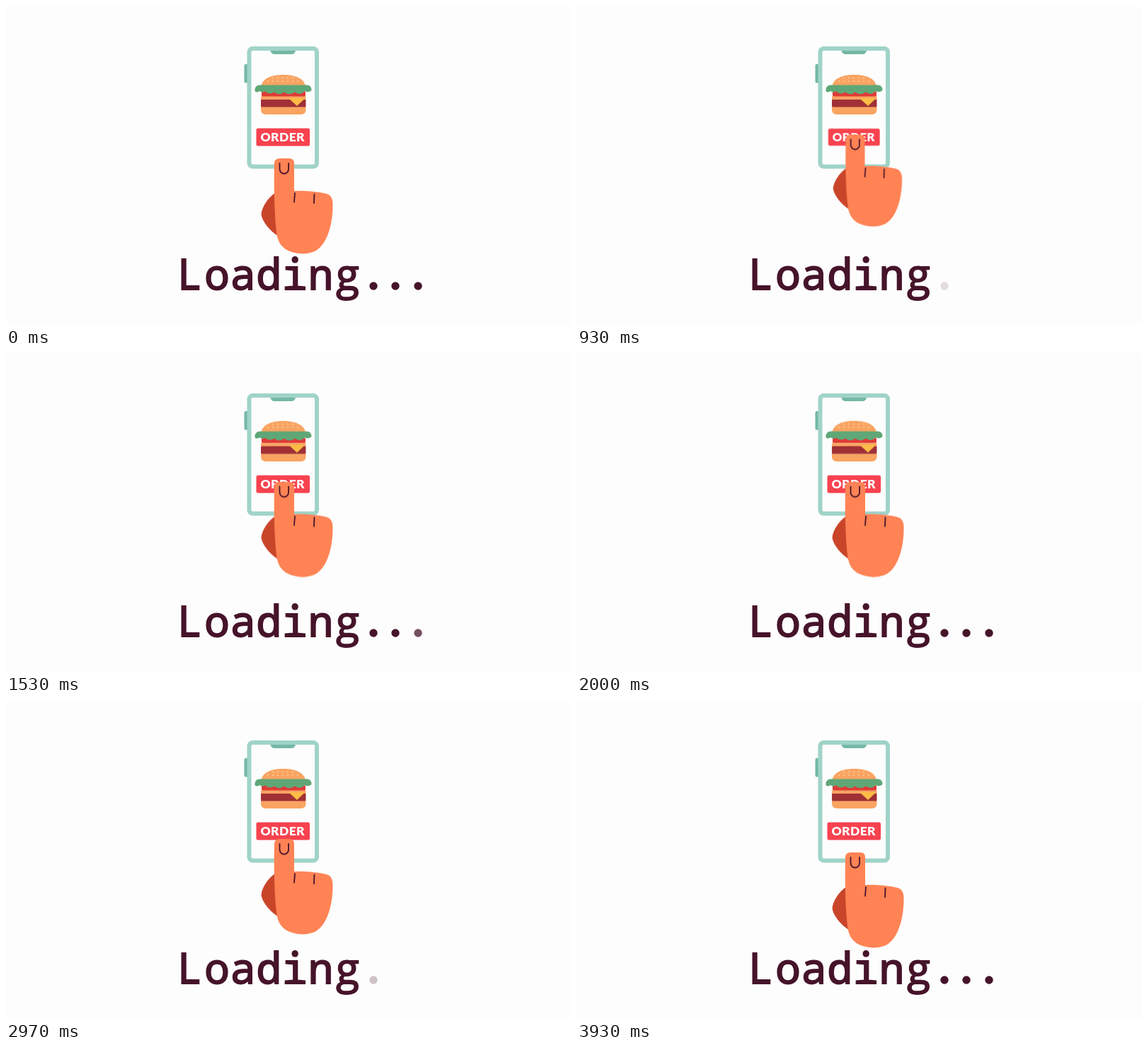
Animation of 798x450 px, one loop 4010 ms. Source, as an HTML page:

```html
<!DOCTYPE html>
<html lang="en">
<head>
<meta charset="utf-8">
<title>Loading</title>
<style>
  html, body { margin: 0; width: 100%; height: 100%; overflow: hidden; background: #fdfdfd; }
  svg { display: block; width: 100vw; height: 100vh; }

  .reach, .press, .layer { animation: 4010ms linear infinite; }
  .reach { animation-name: reach; }
  .press { animation-name: press; }
  .layer { animation-name: hop; }
  .hand { transform-origin: 393px 215px; }
  .button { transform-origin: 391.3px 185px; }

  @keyframes reach {
    0%, 8% { transform: none; animation-timing-function: ease-in-out; }
    21.2%, 67.3% { transform: translateY(-33.500px); animation-timing-function: ease-in-out; }
    82%, 100% { transform: none; }
  }
  @keyframes press {
    0%, 21.2% { transform: none; animation-timing-function: ease-out; }
    23.4% { transform: scale(.963); animation-timing-function: ease-in-out; }
    27%, 100% { transform: none; }
  }
  /* --k: share of the hop each burger layer takes */
  @keyframes hop {
    0%, 26.4%, 38.65%, 50.9% { transform: none; animation-timing-function: ease-out; }
    32.5% { transform: translateY(calc(var(--k) * -9px)); animation-timing-function: ease-in; }
    44.8%, 57% { transform: translateY(calc(var(--k) * -5px)); animation-timing-function: ease-in; }
    63%, 100% { transform: none; }
  }

  .dot { fill: #46142a; animation: 2005ms linear infinite; }
  .d1 { animation-name: blink1; }
  .d2 { animation-name: blink2; }
  .d3 { animation-name: blink3; }
  @keyframes blink1 { 0%, 9% { opacity: 1 } 24%, 44.1% { opacity: 0 } 60.3%, 100% { opacity: 1 } }
  @keyframes blink2 { 0%, 16.5% { opacity: 1 } 29.4%, 53% { opacity: 0 } 70.5%, 100% { opacity: 1 } }
  @keyframes blink3 { 0%, 24% { opacity: 1 } 38%, 63.3% { opacity: 0 } 80.8%, 100% { opacity: 1 } }

  .label { font: 900 17.500px Lato, sans-serif; letter-spacing: .4px; fill: #fff; text-anchor: middle; }
  .loading { font: 400 60px "Noto Sans Mono", monospace; letter-spacing: .6px; fill: #46142a; stroke: #46142a; stroke-width: 1.800; }
  .g { font-family: "Open Sans", sans-serif; }
  .bun { fill: #f9a462; }
  .seeds { fill: none; stroke: #fdd3a0; stroke-width: 1.800; stroke-linecap: round; stroke-dasharray: 0 7; }
  .line { fill: none; stroke: #46142a; stroke-width: 1.800; stroke-linecap: round; }
</style>
</head>
<body>
<svg viewBox="0 0 798 450">
  <!-- phone -->
  <rect x="336.500" y="82" width="6" height="26.500" rx="2" fill="#74b8a5"/>
  <rect x="343.500" y="60" width="95.500" height="166.500" rx="5" fill="#fdfdfd" stroke="#a0d3c8" stroke-width="6"/>
  <path d="M373.500 63H409Q408 68 403 68H379.500Q374.500 68 373.500 63Z" fill="#74b8a5"/>

  <!-- burger -->
  <path class="bun" d="M360 142H423.500V146Q423.500 153 416.500 153H367Q360 153 360 146Z"/>
  <rect class="layer" style="--k:.2" x="360" y="131" width="63.500" height="11.500" rx="1.500" fill="#a03036"/>
  <rect class="layer" style="--k:.6" x="361" y="120" width="62" height="8" rx="2" fill="#df3b36"/>
  <g class="layer" style="--k:.45">
    <rect class="bun" x="360" y="127.500" width="63.500" height="4.500"/>
    <path d="M399 130H422.500L411 141Z" fill="#fcbc46"/>
  </g>
  <g class="layer" style="--k:1">
    <path class="bun" d="M360 115C361 102 375 97 391.500 97S422 102 423.500 115Z"/>
    <path class="seeds" d="M377 101.500H408M370 106H416"/>
  </g>
  <path class="layer" style="--k:.8" fill="#5fa777"
    d="M358 111.500H425C429 111.500 432 115 431.500 119Q427 123 422 120Q415 127 408 121.500Q400 127 393 121.500Q386 127 379 121.500Q372 126 366 120.500Q362 123 358 120Q354 123 351.500 120C351 115 354 111.500 358 111.500Z"/>

  <g class="press button">
    <rect x="353.500" y="172.500" width="75.500" height="25" rx="2.500" fill="#f7424f"/>
    <text class="label" x="390.700" y="191.200">ORDER</text>
  </g>

  <text class="loading" y="400"><tspan x="241.500">L</tspan><tspan x="280">oadin</tspan><tspan class="g" x="466">g</tspan></text>
  <circle class="dot d1" cx="519" cy="395" r="5.700"/>
  <circle class="dot d2" cx="550" cy="395" r="5.700"/>
  <circle class="dot d3" cx="582" cy="395" r="5.700"/>

  <g class="reach">
    <g class="press hand">
      <path d="M381 263C370 270 361 284 360.500 294C362 304 372 317 385 325Z" fill="#c9452a"/>
      <path fill="#ff8355"
        d="M379 222Q379 215 387 215H400Q407 215 407 222V261C425 260 445 263 453 265Q461 267 461.500 278C462 305 455 330 443 341Q435 349.500 418 349.500Q388 348 383 325C380 305 378 270 379 222Z"/>
      <path class="line" d="M386.500 222V230A6.300 6.500 0 0 0 399.100 230V222M408 264L407 276.500M435.500 265.500L435 278"/>
    </g>
  </g>
</svg>
</body>
</html>
```
